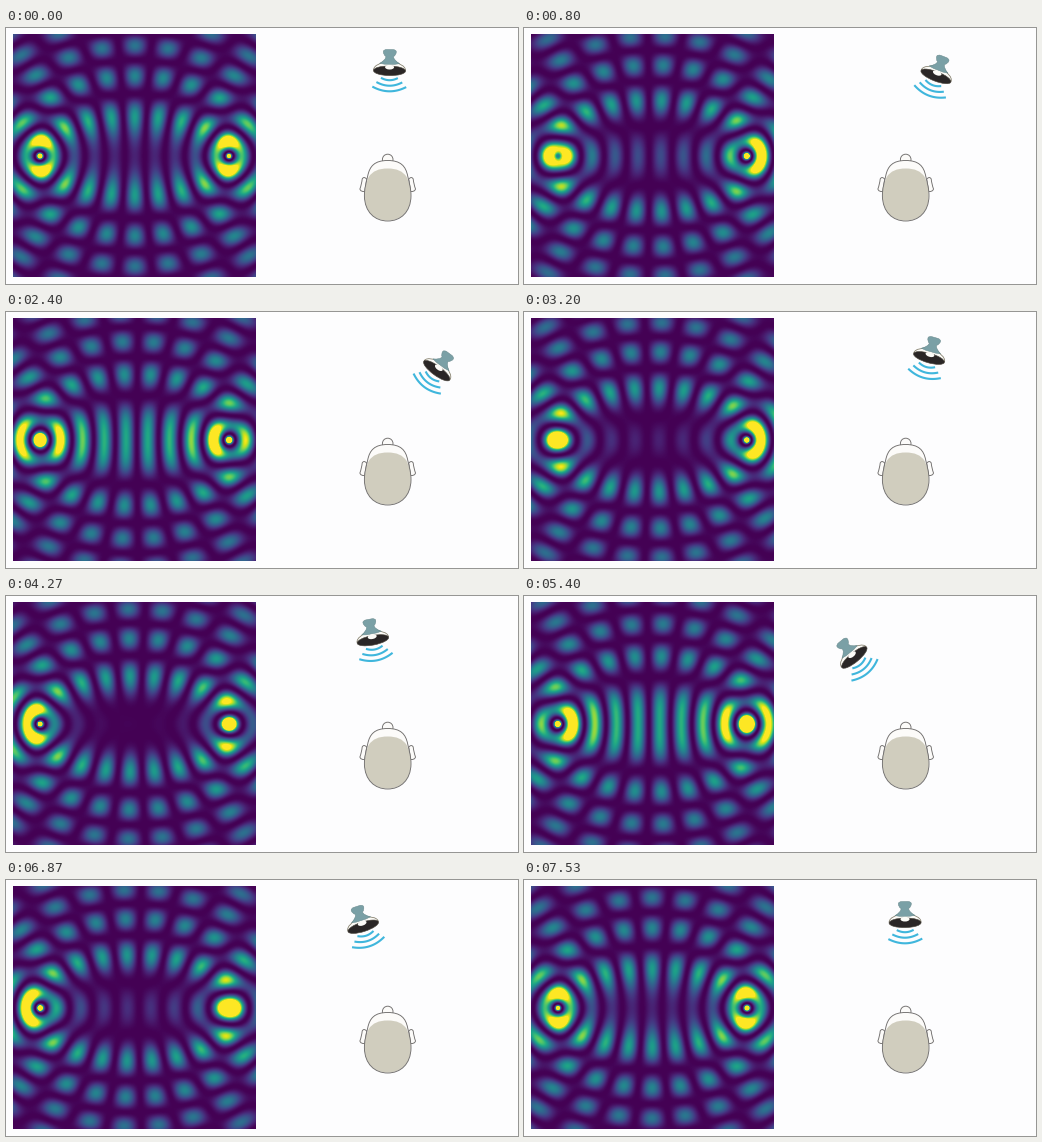
These frames come from a looping animation (512 by 256 pixels, 7.59 s). A matplotlib script:

```python
import matplotlib.pyplot as plt
import numpy as np
from matplotlib.animation import FuncAnimation
from matplotlib.patches import Circle, Ellipse, PathPatch
from matplotlib.path import Path
from matplotlib.transforms import Affine2D

W, H, DPI = 512, 256, 100
LOOP_MS, FRAMES = 7590, 114
PX = 72 / DPI

# Wave field
X0, Y0, SIZE = 7, 6, 243
WAVELENGTH = 43
EARS = (34, 223)
EAR_Y = 128
NULL_RADIUS = WAVELENGTH / 8
DELAY_PER_RAD = 41.5
GAIN = 0.6 * 94.5 / 4

# Loudspeaker orbit
PIVOT = (382.3, 124.5)
STEP_DEG = 1.7

fig = plt.figure(figsize=(W / DPI, H / DPI), dpi=DPI, facecolor="#fdfdfe")
ax = fig.add_axes([0, 0, 1, 1])
ax.axis("off")

gx, gy = np.meshgrid(X0 + 0.5 + np.arange(SIZE), Y0 + 0.5 + np.arange(SIZE))
radii = [np.maximum(np.hypot(gx - x, gy - EAR_Y), 0.5) for x in EARS]


def angle_at(i):
    """Loudspeaker angle in degrees: a linear sweep right, left and back."""
    steps = np.interp(i, [-0.5, 28.4, 85.65, 113.5], [0, 28.9, -27.85, 0])
    return STEP_DEG * steps


def intensity(deg):
    """Two circular waves; only the ear facing away is delayed."""
    delay = DELAY_PER_RAD * np.radians(deg)
    k = 2 * np.pi / WAVELENGTH
    u = sum(np.sin(k * (r - NULL_RADIUS - max(d, 0))) / np.sqrt(r)
            for r, d in zip(radii, (delay, -delay)))
    return GAIN * u ** 2


def curve(start, *segments):
    """Closed path; each segment holds 2, 4 or 6 numbers (line, quad, cubic)."""
    verts, codes = [start], [Path.MOVETO]
    for seg in segments:
        pts = [seg[i:i + 2] for i in range(0, len(seg), 2)]
        code = {1: Path.LINETO, 2: Path.CURVE3, 3: Path.CURVE4}[len(pts)]
        verts += pts
        codes += [code] * len(pts)
    return Path(verts + [start], codes + [Path.CLOSEPOLY])


def add(patch, face, edge="none", lw=0.0, z=2):
    patch.set(facecolor=face, edgecolor=edge, linewidth=lw * PX, zorder=z)
    ax.add_patch(patch)
    return patch


def draw_head():
    line, skin, hair = "#6f6d6c", "#fcfbf9", "#d0cdbe"
    cx = 381.7
    add(Circle((cx, 131.5), 5.3), skin, line, 0.9)
    for side in (-1, 1):
        ear = curve((cx + side * 21, 151),
                    (cx + side * 24, 148, cx + side * 25.5, 151),
                    (cx + side * 26, 156, cx + side * 27.8, 161),
                    (cx + side * 27, 164, cx + side * 23, 163.5))
        add(PathPatch(ear), skin, line, 0.9)
    skull = curve((cx, 132.5),
                  (cx + 13, 132.5, cx + 18, 138, cx + 20, 148),
                  (cx + 21.5, 155, cx + 23.3, 160, cx + 23.3, 168),
                  (cx + 23, 184, cx + 13, 193, cx, 193),
                  (cx - 13, 193, cx - 23, 184, cx - 23.3, 168),
                  (cx - 23.3, 160, cx - 21.5, 155, cx - 20, 148),
                  (cx - 18, 138, cx - 13, 132.5, cx, 132.5))
    add(PathPatch(skull), skin, z=3)
    cap = curve((cx, 140.5),
                (cx + 9, 140.5, cx + 15, 143, cx + 19, 149),
                (cx + 21.5, 155, cx + 23, 160, cx + 23, 168),
                (cx + 23, 184, cx + 13, 192.5, cx, 192.5),
                (cx - 13, 192.5, cx - 23, 184, cx - 23, 168),
                (cx - 23, 160, cx - 21.5, 155, cx - 19, 149),
                (cx - 15, 143, cx - 9, 140.5, cx, 140.5))
    add(PathPatch(cap), hair, z=4)
    add(PathPatch(skull), "none", line, 0.9, z=5)


def draw_speaker():
    cx = PIVOT[0]
    steel, dark = "#7aa0a6", "#2a2626"
    cone = curve((cx - 16, 42),
                 (cx - 15.5, 37, cx - 9, 36, cx - 6, 33.5),
                 (cx + 6, 33.5),
                 (cx + 9, 36, cx + 15.5, 37, cx + 16, 42))
    body = curve((cx - 6.5, 23.5),
                 (cx - 6, 21.5, cx - 3, 21.5),
                 (cx + 3, 21.5),
                 (cx + 6, 21.5, cx + 6.5, 23.5),
                 (cx + 6.5, 27, cx + 3.8, 28.5),
                 (cx + 3.8, 32, cx + 10, 35.5),
                 (cx, 37.5, cx - 10, 35.5),
                 (cx - 3.8, 32, cx - 3.8, 28.5),
                 (cx - 6.5, 27, cx - 6.5, 23.5))
    parts = [
        add(PathPatch(cone), "#fcfbf7", "#85806e", 0.8, z=2),
        add(PathPatch(body), steel, "#68898c", 0.5, z=3),
        add(Ellipse((cx, 42.8), 32, 9.6), dark, "#4a453c", 0.6, z=4),
        add(Ellipse((cx, 39.2), 9, 4.6), "#fcfbf7", z=5),
    ]
    t = np.linspace(-1, 1, 25)
    for half, bottom, sag in ((7.5, 52.2, 1.8), (12, 57.7, 3), (16, 63.3, 4)):
        parts += ax.plot(cx + half * t, bottom - sag * t ** 2,
                         color="#3fb6dc", lw=2.1 * PX, zorder=3)
    return parts


field = ax.imshow(intensity(angle_at(0)), cmap="viridis", vmin=0, vmax=1,
                  extent=(X0, X0 + SIZE, Y0 + SIZE, Y0),
                  interpolation="nearest", aspect="auto")
draw_head()
speaker = draw_speaker()
ax.set_xlim(0, W)
ax.set_ylim(H, 0)


def update(i):
    deg = angle_at(i)
    field.set_data(intensity(deg))
    turn = Affine2D().rotate_deg_around(*PIVOT, deg) + ax.transData
    for part in speaker:
        # Patches keep their own shape transform under the artist one.
        part.set_transform(turn)
    return [field, *speaker]


anim = FuncAnimation(fig, update, frames=FRAMES, interval=LOOP_MS / FRAMES,
                     repeat=True, repeat_delay=0, blit=False)
plt.show()
```
